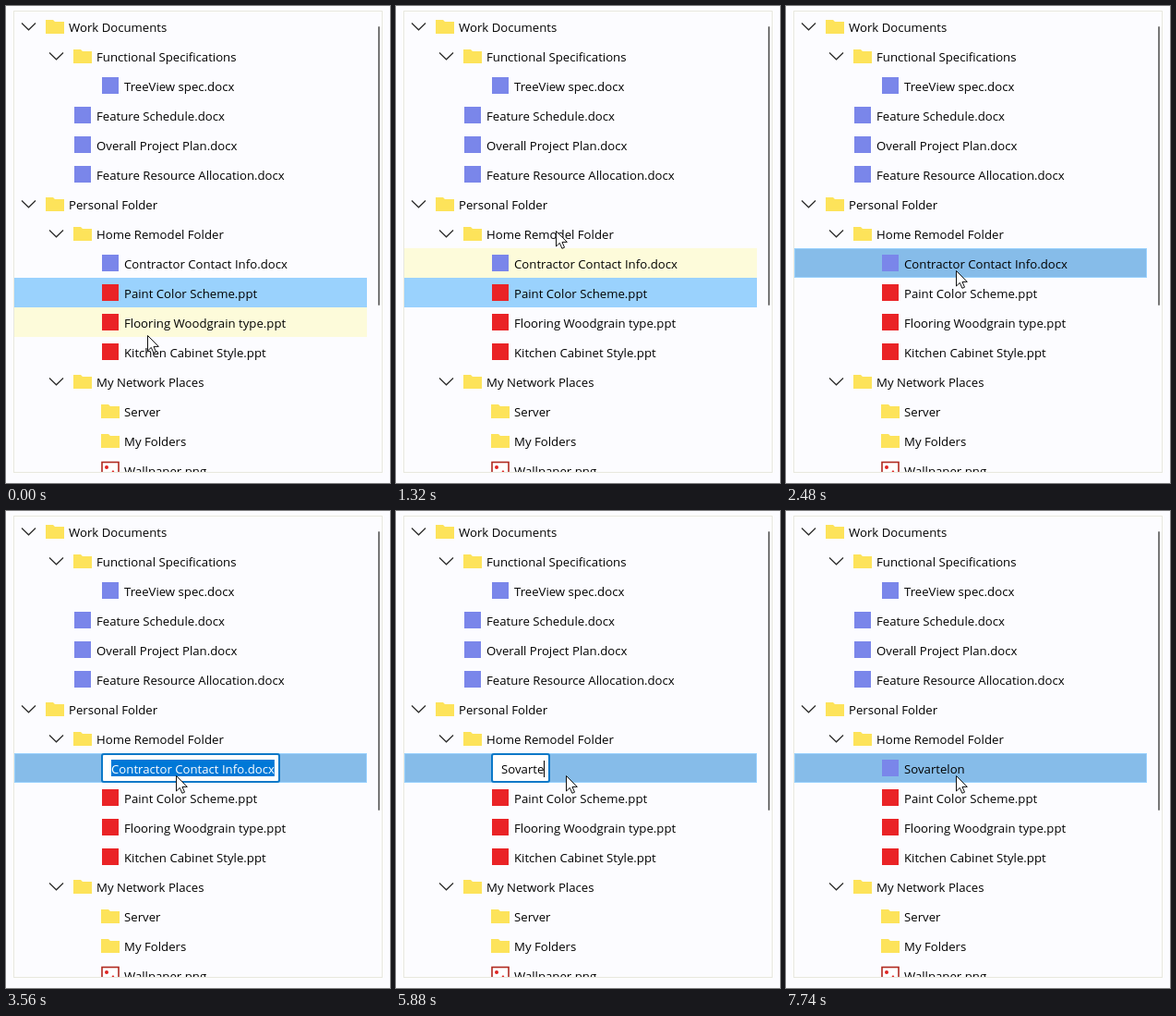
These frames come from a looping animation (416 by 516 pixels, 8 s). An HTML page:

```html
<!DOCTYPE html>
<html lang="en">
<head>
<meta charset="utf-8">
<title>Tree view</title>
<style>
  html, body { margin: 0; width: 100%; height: 100%; overflow: hidden; background: #fcfcff; }
  svg { display: block; }
  text { font: 13.2px "Open Sans", "Noto Sans", sans-serif; fill: #000; white-space: pre; }
</style>
</head>
<body>
<svg id="stage" width="416" height="516" viewBox="0 0 416 516">
  <defs>
    <clipPath id="view"><rect x="9" y="6" width="398" height="498"/></clipPath>
    <path id="chevron" d="M-7.5 -3.5 L0 3.8 L7.5 -3.5" fill="none" stroke="#2a2a2a" stroke-width="1.2"/>
    <path id="folder" d="M0 0h8l2 2h10v13h-20z" fill="#fde35a"/>
    <rect id="doc" x="1" y="-2" width="18" height="18" fill="#7a86ea"/>
    <rect id="ppt" x="1" y="-2" width="18" height="18" fill="#ea2326"/>
    <g id="image">
      <rect x="1" y="-1.5" width="18" height="17" fill="#fff" stroke="#b02a20" stroke-width="1.6"/>
      <circle cx="6" cy="4" r="2" fill="#e02420"/>
      <path d="M3 14l4-4 2 2 4-5 5 7z" fill="#e02420"/>
    </g>
  </defs>
  <rect x="8.5" y="5.5" width="399" height="499" fill="none" stroke="#e8e8de"/>
  <g clip-path="url(#view)">
    <rect id="hover" x="9" width="382" height="32" fill="#fdfbda"/>
    <rect id="picked" x="9.5" width="381" height="31" stroke="#99d1ff"/>
    <g id="rows"></g>
    <g id="editor">
      <rect id="box" x="104" y="263" height="30" rx="2" fill="#fff" stroke="#0a78c8" stroke-width="2"/>
      <rect id="mark" x="114" y="269" height="18" fill="#0078d7"/>
      <text id="input" x="114" y="284"></text>
      <rect id="caret" y="270" width="1" height="18" fill="#000"/>
    </g>
  </g>
  <rect x="403" y="22" width="2" height="302" rx="1" fill="#777"/>
  <path id="arrow" d="M0 0V16.5L3.8 12.9L6.4 18.8L9 17.7L6.5 11.9H11.8Z" fill="#fff" stroke="#111"/>
  <path id="beam" d="M-3.5 -7.5H-1L0 -6.5L1 -7.5H3.5M0 -6.5V6.5M-3.5 7.5H-1L0 6.5L1 7.5H3.5" fill="none" stroke="#3d5060"/>
</svg>
<script>
const LOOP = 8000, STEP = 77.5, TOP = 6, ROW = 32, EDIT_ROW = 8;
const OLD_NAME = "Contractor Contact Info.docx", NEW_NAME = "Sovartelon";
const CLICK = 2170, EDIT = 3560, COMMIT = 7120;
const BEAM_ON = 3640, BEAM_OFF = 5030;
const KEYS = [4490, 4880, 5260, 5500, 5580, 5730, 5880, 6430, 6580, 6740];

// depth, icon, label, open
const TREE = [
  [0, "folder", "Work Documents", true],
  [1, "folder", "Functional Specifications", true],
  [2, "doc", "TreeView spec.docx"],
  [1, "doc", "Feature Schedule.docx"],
  [1, "doc", "Overall Project Plan.docx"],
  [1, "doc", "Feature Resource Allocation.docx"],
  [0, "folder", "Personal Folder", true],
  [1, "folder", "Home Remodel Folder", true],
  [2, "doc", OLD_NAME],
  [2, "ppt", "Paint Color Scheme.ppt"],
  [2, "ppt", "Flooring Woodgrain type.ppt"],
  [2, "ppt", "Kitchen Cabinet Style.ppt"],
  [1, "folder", "My Network Places", true],
  [2, "folder", "Server"],
  [2, "folder", "My Folders"],
  [2, "image", "Wallpaper.png"]
];

// time, x, y, easing power of the way there
const PATH = [
  [390, 153, 356, 1],
  [930, 164, 248, 1.5],
  [1160, 168, 145, 1],
  [1470, 178, 338, 1],
  [1630, 180, 305, 1],
  [2010, 184, 286, 0.7]
];

const $ = id => document.getElementById(id);
const set = (el, attrs) => { for (const k in attrs) el.setAttribute(k, attrs[k]); };
const show = (el, on) => { el.style.display = on ? "" : "none"; };
const add = (parent, tag, attrs) => {
  const el = document.createElementNS("http://www.w3.org/2000/svg", tag);
  set(el, attrs);
  return parent.appendChild(el);
};
const [hover, picked, rows, editor, box, mark, input, caret, arrow, beam] =
  ["hover", "picked", "rows", "editor", "box", "mark", "input", "caret", "arrow", "beam"].map($);

const items = TREE.map(([depth, icon, label, open], i) => {
  const g = add(rows, "g", {});
  const x = 30 * depth, y = TOP + ROW * i;
  if (open) add(g, "use", { href: "#chevron", x: x + 24.5, y: y + 16 });
  add(g, "use", { href: "#" + icon, x: x + 43, y: y + 9 });
  const text = add(g, "text", { x: x + 68, y: y + 22 });
  text.textContent = label;
  return { g, text };
});

function cursorAt(t) {
  let from = PATH[0];
  for (const to of PATH) {
    if (t < to[0]) {
      if (to === from) break;
      const u = ((t - from[0]) / (to[0] - from[0])) ** to[3];
      return [1, 2].map(k => from[k] + (to[k] - from[k]) * u);
    }
    from = to;
  }
  return [from[1], from[2]];
}

function drawEditor(t) {
  const editing = t >= EDIT && t < COMMIT;
  show(editor, editing);
  show(items[EDIT_ROW].g, !editing);
  items[EDIT_ROW].text.textContent = t < COMMIT ? OLD_NAME : NEW_NAME;
  if (!editing) return;

  const typed = KEYS.filter(k => t >= k).length;
  input.textContent = typed ? NEW_NAME.slice(0, typed) : OLD_NAME;
  input.style.fill = typed ? "" : "#fff";
  const w = input.getComputedTextLength();
  set(box, { width: Math.max(64, Math.round(w + 17)) - 2 });
  set(mark, { width: w });
  set(caret, { x: Math.round(113.5 + w) });
  show(mark, !typed);
  show(caret, typed);
}

function render(time) {
  // the screen refreshes on a fixed grid; 12 ms absorbs rounding of its times
  const t = Math.floor((time + 12) / STEP) * STEP + 12;
  const [x, y] = cursorAt(t - 12).map(Math.round);
  const over = Math.floor((cursorAt(t + 48)[1] - TOP) / ROW);
  const chosen = t < CLICK ? 9 : EDIT_ROW;

  set(hover, { y: TOP + ROW * over });
  set(picked, { y: TOP + ROW * chosen + 0.5, fill: over === chosen ? "#86bce9" : "#9ad2fd" });
  drawEditor(t);

  const isBeam = t >= BEAM_ON && t < BEAM_OFF;
  show(arrow, !isBeam);
  show(beam, isBeam);
  set(arrow, { transform: `translate(${x + 0.5} ${y + 0.5})` });
  set(beam, { transform: `translate(${x + 2.5} ${y + 1})` });
}

const start = performance.now();
function tick() {
  render((performance.now() - start) % LOOP);
  requestAnimationFrame(tick);
}
tick();
</script>
</body>
</html>
```
